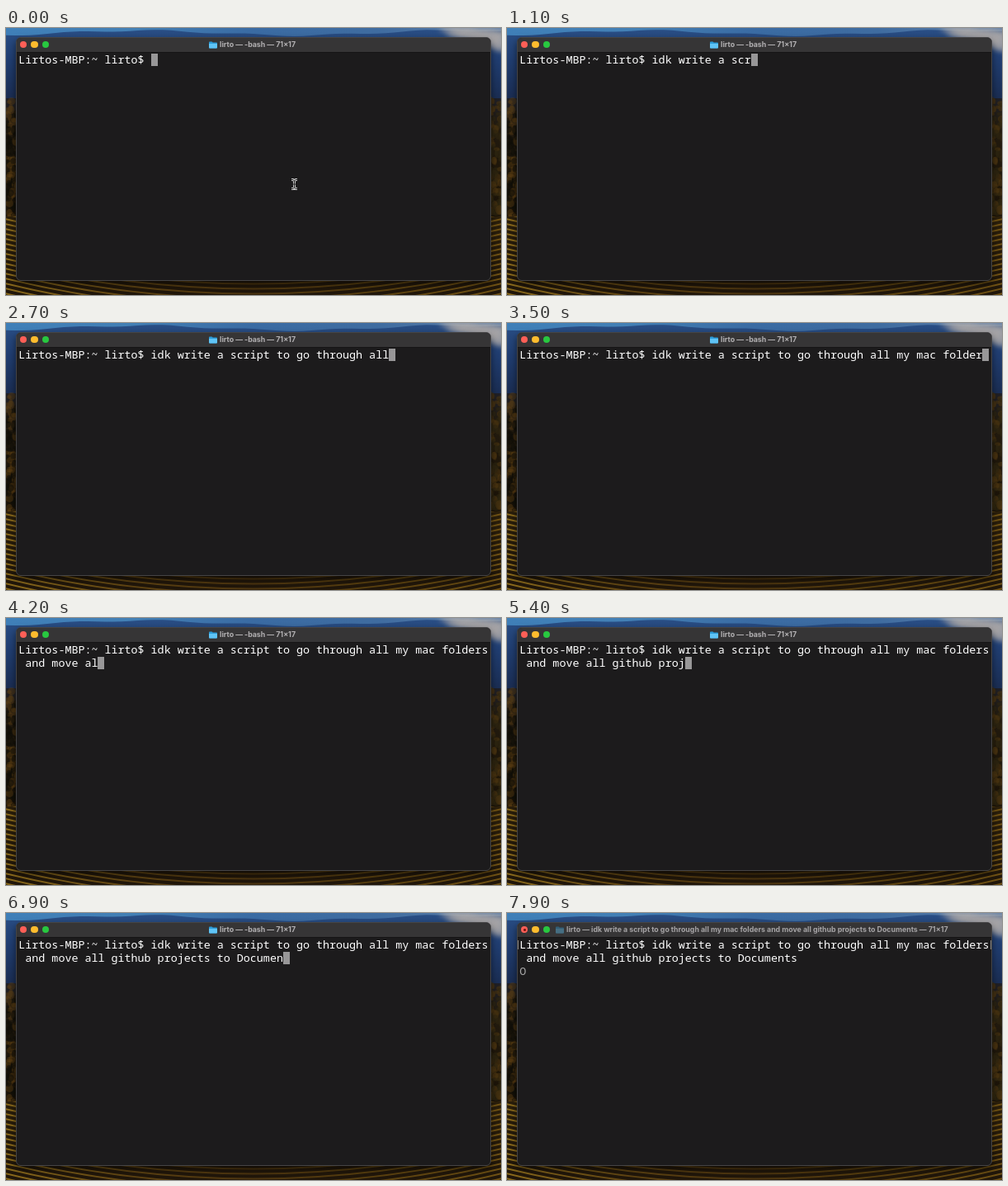
Write an HTML page with a canvas that moves like this. It is 600 px wide and 323 px high and loops after 8 s.

```html
<!DOCTYPE html>
<html lang="en">
<head>
<meta charset="utf-8">
<title>Terminal</title>
<style>
html, body { margin: 0; width: 100%; height: 100%; overflow: hidden; background: #17150f; }
#stage { position: relative; width: 600px; height: 323px; overflow: hidden; }
#stage * { position: absolute; box-sizing: border-box; }
#window { left: 12px; top: 11px; width: 576px; height: 295px; border-radius: 6px; overflow: hidden;
  background: #1c1b1c; border: 1px solid #454445; box-shadow: 0 4px 9px #0008; }
#bar { left: 0; top: 0; width: 100%; height: 18px; background: #363536; border-bottom: 1px solid #161516; }
.light { width: 8.6px; height: 8.6px; top: 15.9px; border-radius: 50%; }
#busy { left: 20px; top: 19px; width: 2.6px; height: 2.6px; border-radius: 50%; background: #7c1512; }
#folder { top: 15.5px; }
#title { top: 14px; font: 700 8.8px/12px Inter, sans-serif; color: #b3b1b3; white-space: pre; }
#text, #spinner { left: 15.3px; margin: 0; font: 500 13.36px/16px "Noto Sans Mono", monospace; color: #fff; }
#text { top: 30px; }
#spinner { top: 62px; font-weight: 400; color: #aaa; }
#cursor { width: 8px; height: 15px; background: #989798; }
.mark { top: 33px; width: 1px; height: 11px; background: #858485; }
</style>
</head>
<body>
<div id="stage">
  <canvas id="wall" width="600" height="323"></canvas>
  <div id="window"><div id="bar"></div></div>
  <i class="light" style="left:16.9px;background:#ff5f57"></i>
  <i class="light" style="left:30.3px;background:#febc2e"></i>
  <i class="light" style="left:43.8px;background:#28c840"></i>
  <i id="busy"></i>
  <svg id="folder" width="10" height="9">
    <path d="M0 1.5Q0 .5 1 .5H3.5L4.7 1.6H9Q10 1.6 10 2.6V7.5Q10 8.5 9 8.5H1Q0 8.5 0 7.5Z" fill="#2b9bd8"/>
    <path d="M0 3H10V7.5Q10 8.5 9 8.5H1Q0 8.5 0 7.5Z" fill="#5fc3f5"/>
  </svg>
  <div id="title"></div>
  <div id="cursor"></div>
  <pre id="text"></pre>
  <div id="spinner">O</div>
  <i class="mark" style="left:13px"></i>
  <i class="mark" style="left:586px"></i>
  <svg id="pointer" style="left:344px;top:182px" width="11" height="14" fill="none">
    <path d="M2 1.5H4L5.5 3L7 1.5H9M5.5 3V11M2 12.5H4L5.5 11L7 12.5H9M4 7H7" stroke="#c8c8c8" stroke-width="3"/>
    <path d="M2 1.5H4L5.5 3L7 1.5H9M5.5 3V11M2 12.5H4L5.5 11L7 12.5H9M4 7H7" stroke="#222"/>
  </svg>
</div>
<script>
const $ = id => document.getElementById(id);
const LOOP = 8000, COLS = 71, PITCH = 8.016, RUN = 7500;
const user = "lirto", prompt = `Lirtos-MBP:~ ${user}$ `;
const command = "idk write a script to go through all my mac folders and move all github projects to Documents";
// [time, characters typed]
const typing = [[0, 0], [1100, 15], [2700, 36], [4200, 63], [5400, 76], [6200, 84], [7100, 93], [LOOP, 93]];

function paintWall() {
  const c = $("wall").getContext("2d");
  let seed = 7;
  const rnd = () => (seed = seed * 16807 % 2147483647) / 2147483647;
  const gradient = (x, y, ...colors) => {
    const g = c.createLinearGradient(0, 0, x, y);
    colors.forEach((color, i) => g.addColorStop(i / (colors.length - 1), color));
    return g;
  };
  const blob = (x, y, rx, ry, color) => {
    c.fillStyle = color;
    c.beginPath();
    c.ellipse(x, y, rx, ry, 0, 0, 7);
    c.fill();
  };
  // sky, distant hills and clouds
  c.fillStyle = gradient(600, 0, "#3f7fb8", "#4380b5", "#3a6ba3", "#3f6ca0", "#5f7fa8");
  c.fillRect(0, 0, 600, 50);
  c.fillStyle = gradient(0, 120, "#2a4f86", "#203d70", "#1b2f56", "#182238");
  c.beginPath();
  c.moveTo(0, 12);
  for (let x = 0; x <= 600; x += 10) c.lineTo(x, 6 + 3 * Math.sin(x / 60 + 2) + Math.sin(x / 17));
  c.lineTo(600, 120);
  c.lineTo(0, 120);
  c.fill();
  c.filter = "blur(3px)";
  for (let i = 0; i < 9; i++) blob(538 + i * 8, 1 + i * 1.5 + 4 * rnd(), 12, 5 + i, "#b9b2ad88");
  c.filter = "none";
  // woods
  c.fillStyle = gradient(0, 240, "#1b2f56", "#1b2236", "#241c10", "#1e160a", "#1b1308");
  c.fillRect(0, 85, 600, 155);
  for (let i = 0; i < 170; i++) {
    const x = i % 2 ? rnd() * 14 : 586 + rnd() * 14, y = 88 + rnd() * 145;
    blob(x, y, 2 + rnd() * 3, 2 + rnd() * 4, ["#4a331099", "#110f0899", "#2f261099", "#63431466"][i % 4]);
  }
  // vineyard rows
  c.fillStyle = gradient(0, 323, "#3a2a0c", "#33250c", "#20160a");
  c.fillRect(0, 228, 600, 95);
  c.save();
  c.beginPath();
  c.rect(0, 228, 600, 95);
  c.clip();
  c.strokeStyle = gradient(600, 0, "#8a6a1c", "#5e4312", "#4a330f", "#59400f", "#705214");
  c.lineWidth = 2;
  for (let y = 200; y < 325; y += 6) {
    c.beginPath();
    c.moveTo(-5, y);
    c.quadraticCurveTo(300, y + 75, 605, y);
    c.stroke();
  }
  c.restore();
}

function typedAt(t) {
  const i = typing.findIndex(p => p[0] > t);
  const [t0, n0] = typing[i - 1], [t1, n1] = typing[i];
  return Math.floor(n0 + (n1 - n0) * (t - t0) / (t1 - t0) + 1e-6);
}

const show = (el, on) => el.style.visibility = on ? "visible" : "hidden";

function draw(now) {
  const t = Math.floor(now % LOOP / 100) * 100;
  const n = typedAt(t), running = t >= RUN;
  const line = prompt + command.slice(0, n);
  $("text").textContent = line.slice(0, COLS) + "\n" + line.slice(COLS);
  $("cursor").style.left = 15.3 + line.length % COLS * PITCH + "px";
  $("cursor").style.top = 31 + Math.floor(line.length / COLS) * 16 + "px";
  $("title").textContent = `${user} — ${running ? command : "-bash"} — 71×17`;
  $("title").style.left = (running ? 72 : 259) + "px";
  $("title").style.color = running ? "#a6a4a6" : "#b3b1b3";
  $("folder").style.left = (running ? 59 : 246) + "px";
  $("folder").style.opacity = running ? 0.4 : 1;
  show($("cursor"), !running);
  show($("pointer"), n === 0);
  for (const el of [$("busy"), $("spinner"), ...document.querySelectorAll(".mark")]) show(el, running);
}

paintWall();
const start = performance.now();
function tick() {
  draw(performance.now() - start);
  requestAnimationFrame(tick);
}
tick();
</script>
</body>
</html>
```
